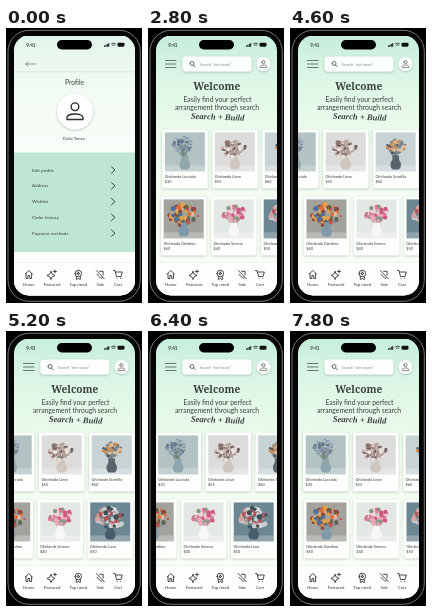
An HTML page for the animation above (8000 ms loop, 136 by 275 pixels).

```html
<!DOCTYPE html>
<html lang="en">
<head>
<meta charset="utf-8">
<title>Flower shop app</title>
<style>
  html, body { margin: 0; width: 100%; height: 100%; overflow: hidden; background: #000; }
  svg { display: block; width: 100vw; height: 100vh; }
  text { font-family: Lato, "Open Sans", sans-serif; fill: #3a403d; }
  .mid { text-anchor: middle; }
  .line { fill: none; stroke: #2a2e2c; stroke-width: .85; stroke-linecap: round; stroke-linejoin: round; }
</style>
</head>
<body>
<svg id="stage" viewBox="0 0 136 275" preserveAspectRatio="none"></svg>
<script>
const LOOP = 8000, STEP = 200, PITCH = 50, TRAVEL = 30, SLIDE = 1200;
const stage = document.getElementById('stage');

const rect = (x, y, w, h, fill, r = 0, extra = '') =>
  `<rect x="${x}" y="${y}" width="${w}" height="${h}" rx="${r}" fill="${fill}" ${extra}/>`;
const circle = (x, y, r, fill, extra = '') =>
  `<circle cx="${x}" cy="${y}" r="${r}" fill="${fill}" ${extra}/>`;
const line = (d, extra = '') => `<path class="line" d="${d}" ${extra}/>`;
const text = (x, y, size, str, extra = '') =>
  `<text x="${x}" y="${y}" font-size="${size}" ${extra}>${str}</text>`;
const at = (x, y, body, id = '') => `<g ${id && `id="${id}"`} transform="translate(${x} ${y})">${body}</g>`;
const SHADOW = 'filter="url(#shadow)"';
const MID = 'class="mid"';

function random(seed) {
  return () => (seed = (seed * 16807) % 2147483647) / 2147483647;
}

// A vase with stems and a loose dome of blossoms in a 40 x 39 picture
function bouquet({ back, vase, petals, seed, x: cx = 20, y: cy = 14, spread = 12, size = 1.9 }) {
  const rnd = random(seed * 7919);
  let stems = '', heads = '';
  for (let i = 0; i < 55; i++) {
    const angle = rnd() * 2 * Math.PI, reach = Math.sqrt(rnd());
    const x = (cx + Math.cos(angle) * reach * spread).toFixed(1);
    const y = (cy + Math.sin(angle) * reach * spread * .75).toFixed(1);
    if (i % 3 === 0) stems += `M20 28L${x} ${y}`;
    heads += circle(x, y, (size * (.5 + rnd() * .7)).toFixed(1), petals[Math.floor(rnd() * petals.length)]);
  }
  return rect(0, 0, 40, 39, back) + rect(0, 33, 40, 6, '#fff', 0, 'opacity=".25"') +
    `<path d="${stems}" stroke="#66766a" stroke-width=".4"/>` +
    `<path d="M16.5 23H23.5Q22.5 27 25 30Q26 35 23 37H17Q14 35 15 30Q17.5 27 16.5 23Z" fill="${vase}"/>` + heads;
}

const rows = [
  [
    { name: 'Ghirlanda Lucciola', price: 30, seed: 3, back: '#b3c3c3', vase: '#8fa6ad', petals: ['#7b8ba6', '#93a3b8', '#65758c', '#a9b6c2', '#6f7f82'], x: 18, y: 12, spread: 10, size: 1.6 },
    { name: 'Ghirlanda Lieve', price: 55, seed: 8, back: '#dbdcdb', vase: '#cfc6c0', petals: ['#b9a39a', '#e9e0da', '#8d7470', '#cdb5ad', '#6f625f'], x: 19, y: 16 },
    { name: 'Ghirlanda Scintilla', price: 60, seed: 13, back: '#c8d3d6', vase: '#59636b', petals: ['#c98e5c', '#46546a', '#dcb98f', '#76818a'], spread: 9, size: 1.7 }
  ],
  [
    { name: 'Ghirlanda Giardino', price: 60, seed: 21, back: '#a3a29d', vase: '#7f9bab', petals: ['#d9713f', '#c2524f', '#e0a44f', '#4f6f9c', '#e3bda9', '#5b6b48', '#8a4a3d'], y: 15, spread: 15, size: 2.3 },
    { name: 'Ghirlanda Sereno', price: 40, seed: 34, back: '#e4e8e4', vase: '#f8f7f5', petals: ['#df7d9c', '#eea5b9', '#cb5b80', '#f5d0d8', '#87997c'], spread: 11, size: 2.1 },
    { name: 'Ghirlanda Luna', price: 50, seed: 55, back: '#6c8793', vase: '#465c6b', petals: ['#b5555a', '#e6dfdc', '#d3a3a0', '#3c5058', '#c9d0d4', '#41566e'], y: 16, spread: 14, size: 2.3 }
  ]
];

const card = (item, i) => at(13 + i * PITCH, 0,
  rect(0, 0, 45.5, 58.5, '#fdfffc', 1.5, SHADOW) +
  at(2.7, 2.7, bouquet(item)) +
  text(2.5, 48, 3.9, item.name) +
  text(2.5, 53.8, 3.9, '$' + item.price));

const person = s => `<g transform="scale(${s})">` +
  line('M-2.4 -3A2.4 2.4 0 1 1 2.4 -3A2.4 2.4 0 1 1 -2.4 -3Z M-5 5V3.8C-5 .8 5 .8 5 3.8V5Z') + '</g>';

const navItems = [
  [22.8, 'Home', 'M-3.6 -.5L0 -4L3.6 -.5 M-2.8 -1V4H-.9V1H.9V4H2.8V-1'],
  [46, 'Featured', 'M-1 -3Q-.6 .4 3 1Q-.6 1.6 -1 5Q-1.4 1.6 -5 1Q-1.4 .4 -1 -3Z M3 -4.5V-1.5M1.5 -3H4.5'],
  [72.3, 'Top rated', 'M-3.3 -1A3.3 3.3 0 1 1 3.3 -1A3.3 3.3 0 1 1 -3.3 -1Z M-2 2V5L0 4L2 5V2 M0 -2.5L.5 -1.3L1.6 -1L.5 -.5L0 .6L-.5 -.5L-1.6 -1L-.5 -1.3Z'],
  [94.3, 'Sale', 'M-4 -4L4 4.3 M-3.4 -.3L.8 4L2 3 M-.8 -3.2H2.8V.6'],
  [112, 'Cart', 'M-4.5 -4H-3L-1.5 2H3L4.3 -2.5H-2.5 M-1 4H-.9 M2.6 4H2.7']
];
const nav = rect(8, 235, 121, 33, '#fdfefd', 0, SHADOW) + navItems.map(([x, label, d]) =>
  at(x, 246.5, line(d)) + text(x, 258, 4.3, label, MID)).join('');

const statusBar = text(20.3, 18.6, 4.6, '9:41', 'font-weight="700"') +
  rect(51, 12, 35, 9.5, '#000', 4.7) +
  [0, 1, 2, 3].map(i => rect(98 + i * 1.4, 17.5 - i * .8, 1, 1.3 + i * .8, '#111')).join('') +
  line('M105.4 15.8Q107.5 14 109.6 15.8M106.4 17.2Q107.5 16.4 108.6 17.2') +
  rect(111.5, 14.7, 7, 4, '#111', 1.1);

const listItems = ['Edit profile', 'Address', 'Wishlist', 'Order history', 'Payment methods'];
const profile = rect(8, 8, 121, 260, 'url(#pale)') +
  rect(8, 43.5, 121, .7, '#b9cec3', 0, 'opacity=".6"') +
  line('M30 36H19.5M22 33.8L19.5 36L22 38.2', 'style="stroke:#838b87"') +
  text(68.5, 57, 6.8, 'Profile', MID) +
  circle(69, 83.5, 18, '#fff', SHADOW) + at(69, 83.5, person(1.6)) +
  text(68, 112, 4.4, 'Dalia Tenzo', MID) +
  rect(8, 124.5, 121, 99.5, '#bfe6d3') +
  listItems.map((label, i) => {
    const y = 142 + i * 15.8;
    return text(26, y + 1.5, 4.6, label) + line(`M105.5 ${y - 3.2}L109 ${y}L105.5 ${y + 3.2}`);
  }).join('');

const home = rect(8, 8, 121, 260, 'url(#mint)') +
  line('M17.5 32.5H28M17.5 36H28M17.5 39.5H28', 'style="stroke:#59625e"') +
  rect(34.5, 28.5, 69, 15, '#fcfffd', 3, SHADOW) +
  line('M42 35.5A2 2 0 1 1 46 35.5A2 2 0 1 1 42 35.5M45.5 37L47.3 38.8', 'style="stroke:#555"') +
  text(51.5, 37.5, 4, 'Search “red roses”', 'style="fill:#8a8a8a"') +
  circle(115.5, 36, 7, '#fcfffd', SHADOW) + at(115.5, 36, person(.65)) +
  text(68.8, 61.5, 10.2, 'Welcome', MID + ' font-weight="600" style="font-family:\'Noto Serif\',serif"') +
  text(69.5, 73.5, 6.8, 'Easily find your perfect', MID) +
  text(69, 82, 6.8, 'arrangement through search', MID) +
  text(69.5, 91.7, 8.6, 'Search + Build', MID + ' font-weight="700" font-style="italic" transform="rotate(2 69 91)" style="font-family:\'Liberation Serif\',serif"') +
  rows.map((items, i) => at(0, 101.7 + i * 67, items.map(card).join(''), 'row' + i)).join('');

const gradient = (id, ...stops) => `<linearGradient id="${id}" x2="0" y2="1">` +
  stops.map(([offset, color]) => `<stop offset="${offset}" stop-color="${color}"/>`).join('') + '</linearGradient>';

stage.innerHTML = `<defs>
  ${gradient('mint', [0, '#c6eedb'], [.15, '#dbf6e6'], [.4, '#eefbed'], [.8, '#f9fef6'])}
  ${gradient('pale', [0, '#e2f5eb'], [.2, '#f2fbf4'], [.6, '#fbfefa'])}
  <filter id="shadow" x="-20%" y="-20%" width="140%" height="150%">
    <feDropShadow dx="0" dy=".8" stdDeviation=".9" flood-color="#31473c" flood-opacity=".35"/>
  </filter>
  <clipPath id="screen">${rect(8, 7.5, 121, 260, '#000', 15)}</clipPath>
</defs>
${rect(0, 0, 136, 275, '#000')}
${rect(2, 2.3, 132.3, 271, '#050506', 21, 'stroke="#77727e" stroke-width="1"')}
<g clip-path="url(#screen)">${home}<g id="profile">${profile}</g>${nav}${statusBar}</g>`;

const [profileLayer, ...rowLayers] = ['profile', 'row0', 'row1'].map(id => document.getElementById(id));

const clamp = v => Math.min(1, Math.max(0, v));
const bezier = (a, b, u) => 3 * (1 - u) ** 2 * u * a + 3 * (1 - u) * u * u * b + u ** 3;

// Ease in and out with a slight pull back at both ends
function easeBack(p) {
  let low = 0, high = 1;
  for (let i = 0; i < 24; i++) {
    const mid = (low + high) / 2;
    if (bezier(.7, .4, mid) < p) low = mid; else high = mid;
  }
  return bezier(-.4, 1.4, low);
}

const slides = [
  { out: 2700, back: 5650 },
  { out: 4250, back: 6900 }
];
const progress = (t, from) => easeBack(clamp((t - from) / SLIDE));

function draw(time) {
  const t = Math.floor((time % LOOP) / STEP) * STEP;
  profileLayer.setAttribute('opacity', 1 - clamp((t - 1200) / 400));
  rowLayers.forEach((row, i) => {
    const { out, back } = slides[i];
    const offset = TRAVEL * (progress(t, out) - progress(t, back));
    row.setAttribute('transform', `translate(${-offset} ${101.7 + i * 67})`);
  });
}

const start = performance.now();
function tick(now) {
  draw(Math.max(0, now - start));
  requestAnimationFrame(tick);
}
draw(0);
requestAnimationFrame(tick);
</script>
</body>
</html>
```
